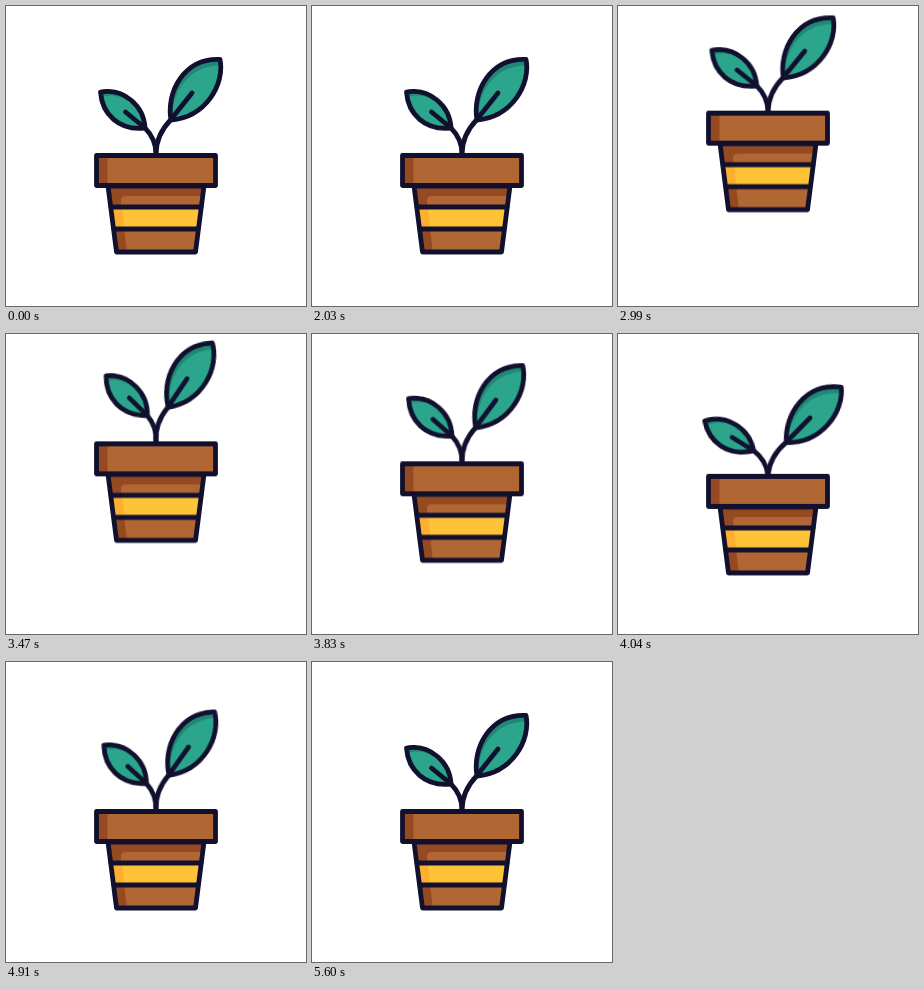
These frames come from a looping animation (300 by 300 pixels, 5.66 s). An HTML page:

```html
<!DOCTYPE html>
<html lang="en">
<head>
<meta charset="utf-8">
<title>Hopping plant</title>
<style>
  html, body { margin: 0; width: 100%; height: 100%; overflow: hidden; background: #fff; }
  svg { display: block; width: 100vw; height: 100vh; }
  .ink { fill: none; stroke: #11112f; stroke-width: 4.8; stroke-linecap: round; stroke-linejoin: round; }
  .plant { animation: hop 5660ms infinite; }
  .leaf { transform-origin: 150px 148px; animation: sway 5660ms infinite; }
  .right { --rise: 15.2deg; --high: -4.5deg; --land: 12.6deg; --back: -6.5deg; }
  .left { --rise: -16.2deg; --high: 5deg; --land: -16deg; --back: 7deg; }

  @keyframes hop {
    0% { transform: translateY(0); }
    35.866% { transform: translateY(0); animation-timing-function: cubic-bezier(.17, .17, .3, 1); }
    54.417% { transform: translateY(-42.5px); }
    58.304% { transform: translateY(-42.5px); animation-timing-function: cubic-bezier(.37, 0, .63, 1); }
    76.237%, 100% { transform: translateY(0); }
  }
  @keyframes sway {
    0%, 35.866%, 98.94%, 100% {
      transform: rotate(0deg);
      animation-timing-function: cubic-bezier(.37, 0, .63, 1);
    }
    44.17% {
      transform: rotate(var(--rise));
      animation-timing-function: cubic-bezier(.37, 0, .63, 1);
    }
    57.42%, 64.717% {
      transform: rotate(var(--high));
      animation-timing-function: cubic-bezier(.37, 0, .63, 1);
    }
    76.502% {
      transform: rotate(var(--land));
      animation-timing-function: cubic-bezier(.37, 0, .63, 1);
    }
    90.636% {
      transform: rotate(var(--back));
      animation-timing-function: cubic-bezier(.37, 0, .63, 1);
    }
  }
</style>
</head>
<body>
<svg viewBox="0 0 300 300">
  <defs>
    <path id="blade-r" d="M165 114C160 86 178 52 214 53.500C219 78 200 111 165 114Z"/>
    <path id="blade-l" d="M139 122C138 100 118 82 94.500 86C96 108 113 125 139 122Z"/>
    <path id="body" d="M102 180L110.500 246H189.500L198 180Z"/>
    <clipPath id="in-r"><use href="#blade-r"/></clipPath>
    <clipPath id="in-l"><use href="#blade-l"/></clipPath>
    <clipPath id="in-body"><use href="#body"/></clipPath>
  </defs>
  <g class="plant">
    <g class="leaf left">
      <use href="#blade-l" fill="#208775"/>
      <g clip-path="url(#in-l)"><use href="#blade-l" x="3" y="4" fill="#2ba58c"/></g>
      <use href="#blade-l" class="ink"/>
      <path class="ink" d="M150 148C150 138 146 129 139 122L119.500 106"/>
    </g>
    <g class="leaf right">
      <use href="#blade-r" fill="#208775"/>
      <g clip-path="url(#in-r)"><use href="#blade-r" x="2" y="6" fill="#2ba58c"/></g>
      <use href="#blade-r" class="ink"/>
      <path class="ink" d="M150 148C150 134 155 124 164.500 114L186 87"/>
    </g>
    <g clip-path="url(#in-body)">
      <rect x="100" y="180" width="100" height="67" fill="#964a22"/>
      <path d="M121 247L115 196Q114.500 190 120 190H200V247Z" fill="#b16734"/>
      <rect x="100" y="201" width="100" height="22" fill="#fdb030"/>
      <path d="M116 201H200V223H118.500Z" fill="#ffc337"/>
    </g>
    <use href="#body" class="ink"/>
    <path class="ink" d="M105 201H195M108 223H192"/>
    <rect x="90.500" y="149.500" width="119" height="30" fill="#b16734"/>
    <rect x="90.500" y="149.500" width="11" height="30" fill="#964a22"/>
    <rect class="ink" x="90.500" y="149.500" width="119" height="30"/>
  </g>
</svg>
</body>
</html>
```
